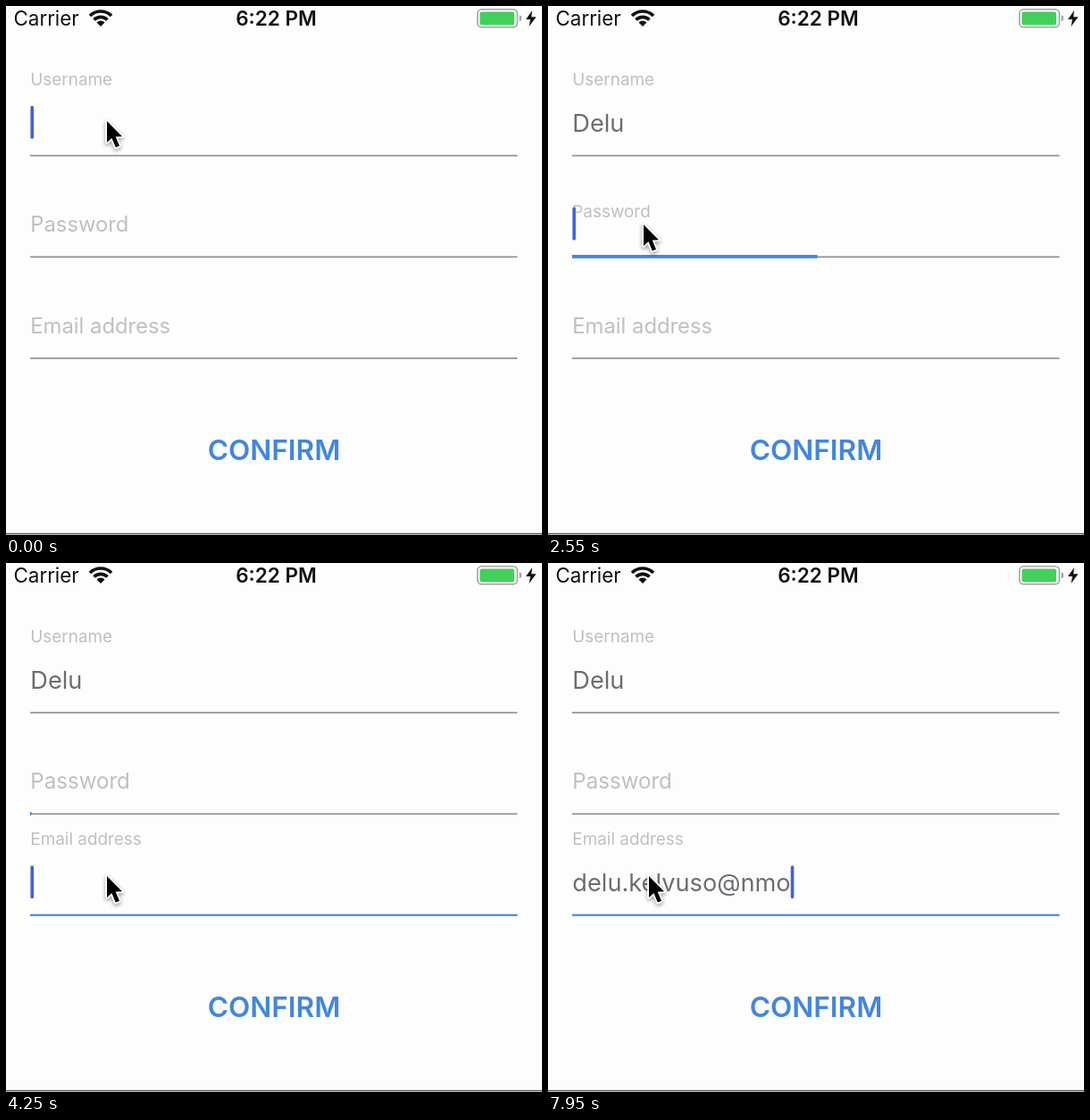
An HTML page with a canvas for the animation above (8000 ms loop, 600 px wide and 593 px high).

```html
<!DOCTYPE html>
<html lang="en">
<head>
<meta charset="utf-8">
<title>Sign-up form</title>
<style>
  html, body { margin: 0; width: 100%; height: 100%; overflow: hidden; background: #fefdfe; }
  canvas { display: block; }
</style>
</head>
<body>
<canvas id="stage" width="600" height="593"></canvas>
<script>
const ctx = document.getElementById('stage').getContext('2d');
const LOOP = 8000, LEFT = 27, WIDTH = 545.5, ROW = 113.6;
const BLUE = '#4286df', CARET = '#4062df', GRAY = '#929196', LABEL = '#bfbec3', INK = '#6c6d71';
const SMALL = 18.9, LARGE = 23.8, INPUT = 27.2;
const FOCUS_LINE = 300, LABEL_MOVE = 500;

// Focus and blur times; keys holds the moment each character appears.
const fields = [
  { label: 'Username', value: 'Delu', keys: [800, 950, 1100, 1250],
    focus: -440, blur: 2400, lineHeight: 0 },
  { label: 'Password', value: '', keys: [],
    focus: 2400, blur: 3742, lineHeight: 3.8 },
  { label: 'Email address', value: 'delu.kelvuso@nmo',
    keys: [5050, 5200, 5350, 5500, 5650, 5900, 6100, 6300, 6500, 6700, 6850, 7000, 7250, 7450, 7650, 7850],
    focus: 3742, blur: Infinity, lineHeight: 1.8 }
];

// Pointer moves: start time, end time, from, to.
const moves = [
  [1600, 2300, [113, 129], [107, 245]],
  [3100, 3650, [107, 245], [113, 351]]
];

const clamp = v => Math.max(0, Math.min(1, v));
const progress = (t, start, duration) => clamp((t - start) / duration);
const ease = p => (1 - Math.cos(Math.PI * p)) / 2;
const mix = (a, b, p) => a + (b - a) * p;

function rect(x, y, w, h, color) {
  ctx.fillStyle = color;
  ctx.fillRect(x, y, w, h);
}

function text(str, x, y, size, color, weight = 400, align = 'left') {
  ctx.font = `${weight} ${size}px Inter, sans-serif`;
  ctx.textAlign = align;
  ctx.fillStyle = color;
  ctx.fillText(str, x, y);
}

function polygon(points, x, y) {
  ctx.beginPath();
  points.forEach(([px, py]) => ctx.lineTo(x + px, y + py));
  ctx.closePath();
}

function roundBox(x, y, w, h, r) {
  ctx.beginPath();
  ctx.roundRect(x, y, w, h, r);
}

function drawStatusBar() {
  text('Carrier', 8.5, 21.5, 22.4, '#111');
  text('6:22 PM', 302.5, 21.5, 22.5, '#111', 600, 'center');

  const from = -Math.PI * 0.75, to = -Math.PI * 0.25;
  ctx.fillStyle = ctx.strokeStyle = '#111';
  ctx.lineWidth = 3.7;
  for (const radius of [10.6, 17]) {
    ctx.beginPath();
    ctx.arc(106, 23, radius, from, to);
    ctx.stroke();
  }
  ctx.beginPath();
  ctx.moveTo(106, 23);
  ctx.arc(106, 23, 6.4, from, to);
  ctx.fill();

  ctx.strokeStyle = '#a3a2a5';
  ctx.lineWidth = 1.6;
  roundBox(527.8, 3.8, 44.6, 20, 4.5);
  ctx.stroke();
  ctx.fillStyle = '#42d158';
  roundBox(530.4, 6.4, 38.6, 14.8, 2);
  ctx.fill();
  ctx.fillStyle = '#a3a2a5';
  roundBox(574.6, 10.6, 2.4, 6.4, [0, 2, 2, 0]);
  ctx.fill();
  ctx.fillStyle = '#111';
  polygon([[7, 0], [0, 10], [5, 10], [3.5, 18], [11.5, 7.2], [6.2, 7.2]], 582, 5);
  ctx.fill();
}

function caretOpacity(elapsed) {
  const phase = elapsed % 1160;
  if (phase < 520) return 1;
  if (phase < 1060) return 1 - progress(phase, 520, 220);
  return progress(phase, 1060, 100);
}

function drawLabel(field, row, t) {
  const up = 82 + row * ROW, down = 131.2 + row * ROW;
  let size = LARGE, y = down;
  if (row === 0) {
    size = SMALL;
    y = up;
  } else if (t >= field.blur) {
    const p = progress(t, field.blur, LABEL_MOVE);
    size = mix(SMALL, LARGE + 0.3, p);
    y = mix(up, down, ease(p));
  } else if (t >= field.focus) {
    size = SMALL;
    y = mix(down - 5, up, ease(progress(t, field.focus, LABEL_MOVE)));
  }
  text(field.label, 27.3, y + size * 0.36, size, LABEL);
}

function drawField(field, row, t) {
  const top = row * ROW, lineY = top + 167.7;
  const focused = t >= field.focus && t < field.blur;
  rect(LEFT, lineY - 0.85, WIDTH, 1.7, GRAY);

  if (t >= field.focus && t < field.blur + LABEL_MOVE + 50 && field.lineHeight) {
    const length = focused
      ? WIDTH * progress(t, field.focus, FOCUS_LINE)
      : Math.max(1.5, WIDTH * (1 - progress(t, field.blur, LABEL_MOVE)));
    rect(LEFT, lineY - 0.4 - field.lineHeight / 2, length, field.lineHeight, BLUE);
  }

  drawLabel(field, row, t);

  const pressed = field.keys.filter(time => time <= t);
  const typed = field.value.slice(0, pressed.length);
  text(typed, 27.3, top + 141.2, INPUT, INK);

  if (focused) {
    const lastEvent = pressed.length ? pressed[pressed.length - 1] : field.focus;
    ctx.globalAlpha = caretOpacity(t - lastEvent);
    ctx.fillStyle = CARET;
    roundBox(LEFT + 0.4 + ctx.measureText(typed).width, top + 112, 3.6, 36.8, 1.5);
    ctx.fill();
    ctx.globalAlpha = 1;
  }
}

function drawPointer(t) {
  let [x, y] = moves[0][2];
  for (const [start, end, a, b] of moves) {
    if (t < start) break;
    const p = progress(t, start, end - start);
    // A slight bow to the right on the way.
    x = mix(a[0], b[0], ease(p)) + 6 * Math.sin(Math.PI * p);
    y = mix(a[1], b[1], ease(p));
  }
  polygon([[0, 0], [0, 24], [5.4, 19], [9.8, 29.6], [14, 27.8], [9.7, 17.6], [17, 17.2]], x, y);
  ctx.save();
  ctx.shadowColor = 'rgba(0, 0, 0, .4)';
  ctx.shadowBlur = 4;
  ctx.shadowOffsetY = 2;
  ctx.strokeStyle = '#fff';
  ctx.lineWidth = 3.6;
  ctx.lineJoin = 'round';
  ctx.stroke();
  ctx.restore();
  ctx.fillStyle = '#000';
  ctx.fill();
}

function draw(now) {
  const t = now % LOOP;
  rect(0, 0, 600, 593, '#fefdfe');
  drawStatusBar();
  fields.forEach((field, row) => drawField(field, row, t));
  text('CONFIRM', 300, 509, 31.6, BLUE, 600, 'center');
  rect(0, 590.8, 600, 1.6, '#5c5c5e');
  drawPointer(t);
}

const startTime = performance.now();
function frame() {
  draw(performance.now() - startTime);
  requestAnimationFrame(frame);
}
frame();
</script>
</body>
</html>
```
